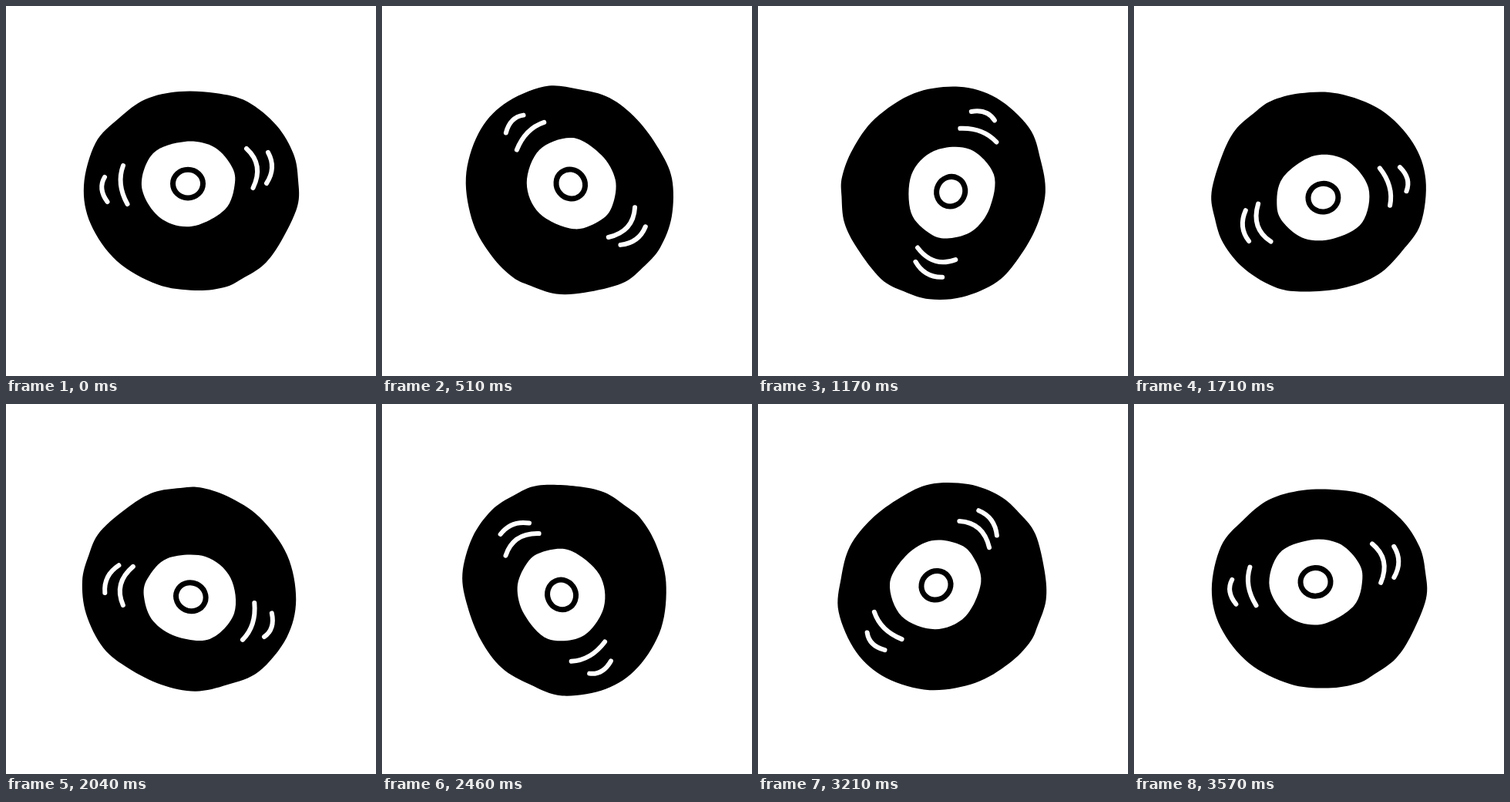
Write an HTML page that moves like this. It is 480x480 px and loops after 3.6 s.

```html
<!DOCTYPE html>
<html lang="en">
<head>
<meta charset="utf-8">
<title>Spinning record</title>
<style>
  html, body { margin: 0; width: 100%; height: 100%; overflow: hidden; background: #fff; }
  svg { display: block; width: 100vw; height: 100vh; }
</style>
</head>
<body>
<svg viewBox="0 0 480 480">
  <g id="record">
    <path id="disc"/>
    <path id="label" fill="#fff"/>
    <ellipse cx="236" cy="230.6" rx="19.5" ry="18.3" fill="none" stroke="#000" stroke-width="7"/>
    <g fill="none" stroke="#fff" stroke-width="6" stroke-linecap="round">
      <path d="M312 185Q335 206 320.5 236"/>
      <path d="M340 190Q351 210 338 230"/>
      <path d="M152 207Q143 231 157.5 257"/>
      <path d="M128 222Q119 237 131.5 254"/>
    </g>
  </g>
</svg>
<script>
const LOOP = 3600, STEP = 30;
const el = id => document.getElementById(id);

// Smooth closed outline through a few "x,y" key points
function blob(keys) {
  const pts = keys.split(' ').map(s => s.split(',').map(Number));
  const at = i => pts[(i + pts.length) % pts.length];
  const handle = (p, to, from) => p.map((v, k) => v + (to[k] - from[k]) / 6);
  const curves = pts.map((p, i) => {
    const q = at(i + 1);
    return `C${handle(p, q, at(i - 1))} ${handle(q, p, at(i + 2))} ${q}`;
  });
  return `M${pts[0]}${curves.join('')}Z`;
}

// Hand-drawn outlines, clockwise from the top
el('disc').setAttribute('d', blob(
  '225,111 272,113 313,124 351,155 373,192 379,226 378,260 357,305 335,335 ' +
  '306,354 283,365 245,369 196,361 144,331 110,283 101,233 116,178 146,146 181,121'));
el('label').setAttribute('d', blob(
  '232,176 268,182 291,205 297,229 284,264 240,286 199,274 176,234 191,191'));

function draw(time) {
  const t = Math.floor(time % LOOP / STEP) * STEP;
  el('record').setAttribute('transform', `rotate(${360 * t / LOOP} 240 240)`);
}

function tick(now) {
  draw(now);
  requestAnimationFrame(tick);
}
draw(0);
requestAnimationFrame(tick);
</script>
</body>
</html>
```
